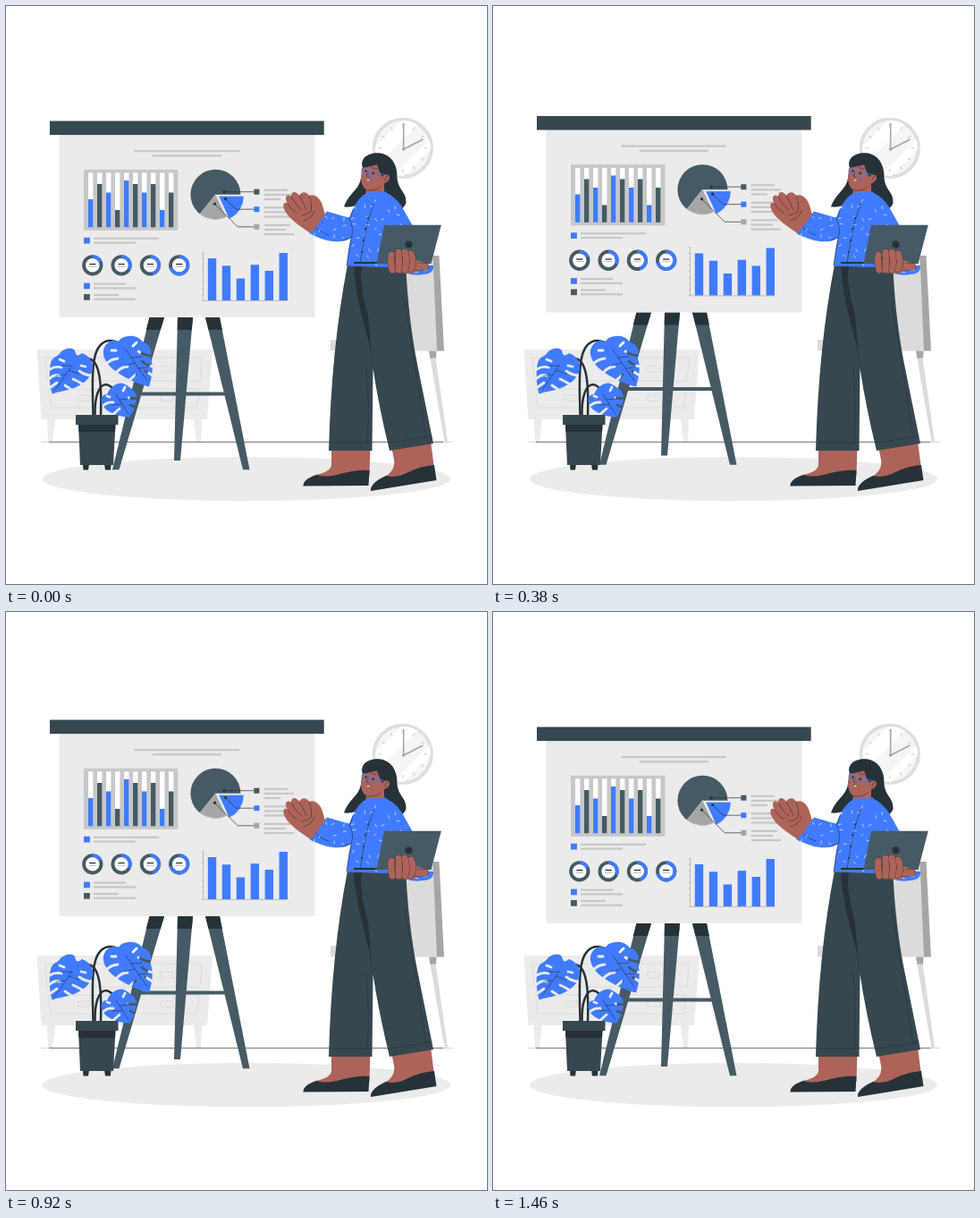
Write an HTML page that moves like this. It is 538 px wide and 646 px high and loops after 1500 ms.

```html
<!DOCTYPE html>
<html lang="en">
<head>
<meta charset="utf-8">
<title>Presentation</title>
<style>
html, body { margin: 0; width: 100%; height: 100%; overflow: hidden; background: #fff; }
svg { display: block; width: 100vw; height: 100vh; }
.blue { fill: #407bff; }
.slate { fill: #455a64; }
.deep { fill: #37474f; }
.ink { fill: #263238; }
.skin { fill: #ae6359; }
.pale { fill: #ebebeb; }
.line { fill: none; stroke: #263238; stroke-width: .6; stroke-linecap: round; stroke-linejoin: round; }
.stem { fill: none; stroke: #263238; stroke-width: 2.5; stroke-linecap: round; }
.slit { fill: none; stroke: #000; stroke-width: 2.8; stroke-linecap: round; }
.drawer { fill: none; stroke: #dbdbdb; stroke-width: .9; }
</style>
</head>
<body>
<svg viewBox="0 0 538 646" preserveAspectRatio="none">
  <defs>
    <clipPath id="face-clip"><circle cx="444" cy="159" r="31"/></clipPath>
    <clipPath id="shirt-clip">
      <path d="M400 211L409 208 424 208Q438 214 446 230L455 246 428 292 381 290.500Q383 270 386 259C378 265 362 266 339 254L359 229.500Q374 234 384 236.500 390 219 400 211Z"/>
    </clipPath>
    <mask id="slits" maskUnits="userSpaceOnUse" x="40" y="360" width="130" height="105">
      <rect x="40" y="360" width="130" height="105" fill="#fff"/>
      <g class="slit">
        <path d="M49 406Q55 402 62 404M48 417Q54 411 60 413M50 426L57 421M97 413Q89 413 82 408M88 424Q82 420 75 417M75 430L66 424M60 395L65 397M84 402L89 403"/>
        <path d="M165 391Q156 391 148 386M165 403Q157 402 152 397M164 413L156 408M111 401Q118 394 125 394M123 410Q129 403 136 403M137 419L145 412M146 376L142 380M118 385L123 385"/>
        <path d="M148 439L137 438M146 449L139 446M108 447Q114 442 120 443M119 457L127 450M133 426L131 430M113 436L116 437"/>
      </g>
    </mask>
  </defs>

  <ellipse class="pale" cx="269" cy="528.6" rx="228" ry="24.6"/>

  <g id="cabinet">
    <path class="pale" d="M34.500 384H231L225 462H39.500ZM46 462H55L52 487H47ZM210 462H219L218 487H213Z"/>
    <path class="drawer" d="M44 393H219.500L217 419H46ZM48 428H216L214 449H50ZM132 393V449"/>
    <path class="drawer" d="M173 402.500H187V409H173ZM173 435H187V441H173ZM80 402.500H94V409H80ZM80 435H94V441H80Z"/>
  </g>
  <path d="M39 487.300H500" stroke="#aaa" stroke-width=".5"/>
  <path d="M48 487.300H489" stroke="#263238" stroke-width=".6"/>

  <g id="clock">
    <circle cx="443.800" cy="158.800" r="32.200" fill="#f5f5f5" stroke="#dedede" stroke-width="3.800"/>
    <path clip-path="url(#face-clip)" fill="#fff" d="M405 165L450 120 468 125 412 181ZM428 195L479 144 483 152 438 197Z"/>
    <g id="ticks" stroke="#c7c7c7" stroke-width=".9"></g>
    <path d="M444.600 161L444.800 131" stroke="#a6a6a6" stroke-width="1.600"/>
    <path d="M444 160.500L466.500 149" stroke="#a6a6a6" stroke-width="1.600"/>
    <circle cx="444.700" cy="160" r="1.800" fill="#a6a6a6"/>
  </g>

  <g id="chair">
    <path d="M440 279H479L483 385.500H363V373H440Z" fill="#dbdbdb"/>
    <path d="M477.500 279H484.500L490 385.500H482ZM473 385.500H481.500L481 394H474.500Z" fill="#a6a6a6"/>
    <path d="M474.500 394L480.500 393 494 487H490.500Z" fill="#dbdbdb"/>
  </g>

  <g id="stand">
    <g class="slate">
      <path d="M150 431.500H245V435.500H150Z"/>
      <path d="M160.500 348H177L126.500 518.300H119Z"/>
      <path d="M192 348H209L195 508H188Z"/>
      <path d="M223 348H239L272.500 518.300H265Z"/>
    </g>
    <path class="ink" d="M160.500 348H177L172.800 362H156.700ZM192 348H209L207.800 362H191.700ZM223 348H239L241.800 362H226.500Z"/>
    <rect class="pale" x="59.500" y="140" width="286" height="208"/>
    <rect class="deep" x="49" y="128.500" width="306.700" height="15.600"/>
    <g id="charts"></g>
  </g>

  <g id="plant">
    <path class="stem" d="M97.500 458C97 420 92 374 117 374Q126 374 134 384"/>
    <path class="stem" d="M106 458C107 425 106 393 90 394Q80 396 74 403"/>
    <path class="stem" d="M99.500 458C99 436 104 423 112 423Q119 424 123 434"/>
    <g class="blue" mask="url(#slits)">
      <path d="M51.500 433.500C48 421 48 407 50 399 52 391 59 392 61 387 66 382 74 381 77 385 78 391 80 392 85 388 93 391 98 397 97 406 94 418 85 423 76 427 68 430 58 431 51.500 433.500Z"/>
      <path d="M160 425.500C150 423 138 418 130 413 118 406 110 398 109 389 108 381 113 376 119 374 124 374 126 376 128 372 134 368 142 368 146 370 151 372 152 376 157 377 163 381 163 388 162 394 165 402 164 413 160 425.500Z"/>
      <path d="M138 459.500C126 459 115 455 110 449 104 442 106 434 113 434 116 427 122 421 130 421.500 135 423 138 426 142 429 147 434 147 440 144 446 144 451 141 455 138 459.500Z"/>
    </g>
    <path class="line" d="M74 402L55 429M134 384L158 419M123 434L137 456M74 402L62 402M70 407L82 411M66 412L56 413M140 393L152 392M144 399L133 402M148 405L158 404M127 440L137 439M130 445L119 446"/>
    <path class="ink" d="M86 512H93L92 518.500H86.500ZM110 512H117.500L117 518.500H111Z"/>
    <path class="deep" d="M81 467H122.500L120 513H83Z"/>
    <path class="ink" d="M81 467H122.500L122 476H81.500Z"/>
    <rect class="deep" x="78" y="457" width="47.500" height="11"/>
  </g>

  <g id="presenter">
    <path class="skin" d="M364 492H407.500L406.500 525 365 532 346 524Q363 521 364 513Z"/>
    <path class="skin" d="M431 492L475 486 479 517 450 533 424 526Q436 519 434 507Z"/>
    <path class="ink" d="M332.500 536.500Q332 529 347 524 356 527 370 524 391 518 406.500 519L405.500 536Z"/>
    <path class="ink" d="M408 542Q407 533 425 525 437 528 450 521 464 514 479 513L481.500 530Z"/>
    <path class="deep" d="M382 289H431L447.500 294C449 330 454 370 460 400L478 489 429 497Q417 448 410.500 405L409.500 497H361Q364 382 382 289Z"/>
    <path class="ink" d="M389 292L398 291Q394 306 405 346L410 406 407 380Q392 330 389 292Z"/>
    <path class="line" d="M362 488H408M428 488L476 481M403 404Q407 450 404 488M390 302Q396 310 404 314M446 330L470 482"/>

    <path class="ink" d="M399 181C395 170 406 163 419 164.500 433 167 438 180 437.500 192 439 207 448 207 447.500 220 444 233 421 230 411 225 404 222 404 215 404 209 398 216 396 226 378 224.500 384 208 395 206 397 192Z"/>
    <path class="skin" d="M404 198L423 196 423 210 411 222 402 211Z"/>
    <path class="skin" d="M398 181Q407 179 415 177.500 418 187 421 191 425 186 429 190 430 196 422 199 418 207 408 206.500 398 206 397 193Z"/>
    <path class="line" d="M424 195Q424 190 428 190M404 206Q414 207 419 202"/>
    <g fill="none" stroke="#407bff" stroke-width=".9">
      <circle cx="402" cy="184.500" r="3.900"/>
      <circle cx="411.500" cy="187.500" r="4.400"/>
      <path d="M416 186.500L424 189"/>
    </g>
    <g class="ink"><circle cx="402.500" cy="184.500" r="1.300"/><circle cx="410.800" cy="186.800" r="1.400"/></g>
    <path class="line" d="M400 179.500L404 180M409 180.500L415 182M405 186L403 190 406 191"/>
    <path d="M403.500 193Q406 194.500 408.500 194 407 196.500 403.500 195.500Z" fill="#fff" stroke="#263238" stroke-width=".5"/>

    <g clip-path="url(#shirt-clip)">
      <rect class="blue" x="335" y="205" width="125" height="90"/>
      <g id="dashes" stroke="#dce7ff" stroke-width=".8" stroke-linecap="round"></g>
    </g>
    <path class="line" d="M384 237Q390 250 386 259L381 290M385 237L388 228M404 211L411 222 424 209M411 222Q404 240 401 258L396 288M345 246Q353 254 361 256M386 259L377 262"/>
    <path class="blue" d="M402 210L406 208 411 221 405 224Q400 218 402 210ZM424 207L427 210 417 224 411 221Z"/>
    <g id="buttons" class="ink"></g>

    <path class="blue" d="M447 290H478Q479 299 467 300 455 302 446 298Z"/>
    <path d="M456 297L461 298M467 296L472 295" stroke="#dce7ff" stroke-width=".8"/>
    <path class="ink" d="M389 286H443V288H389Z"/>
    <path class="slate" d="M423 244.800H486.800L475.500 288H414.500Z"/>
    <circle class="ink" cx="450.500" cy="266.500" r="4.100"/>
    <path class="skin" d="M429 285L456 283 471 288Q474 292 467 293L454 299 431 298Z"/>
    <g id="grip"></g>

    <path class="skin" d="M341 254C328 246 316 237 312 229 308 221 312 218 315 221 310 213 315 209 319 213 319 206 325 207 328 212 331 206 337 208 339 212 345 209 352 215 354 223L357 233Z"/>
    <path class="line" d="M315 221Q320 229 325 231M319 213Q325 224 331 228M328 212Q333 220 336 228M339 212Q343 222 341 230 336 233 331 234M345 229Q342 238 333 240"/>
  </g>
</svg>

<script>
const NS = 'http://www.w3.org/2000/svg';
const BLUE = '#407bff', SLATE = '#455a64', GREY = '#c7c7c7', MID = '#a6a6a6', SKIN = '#ae6359', INK = '#263238';
const $ = id => document.getElementById(id);

function add(parent, tag, attrs) {
  const el = document.createElementNS(NS, tag);
  for (const k in attrs) el.setAttribute(k, attrs[k]);
  return parent.appendChild(el);
}
const charts = $('charts');
const box = (x, y, width, height, fill) => add(charts, 'rect', { x, y, width, height, fill });
const path = (d, fill, stroke = 'none', w = 0) =>
  add(charts, 'path', { d, fill, stroke, 'stroke-width': w });
const rule = (x, y, end) => box(x, y - 1.1, end - x, 2.2, GREY);

function drawCharts() {
  rule(143.5, 162.1, 261);
  rule(164, 167.3, 241);

  // framed columns
  box(87, 182.8, 105.3, 68, GREY);
  [216, 199, 208.5, 228, 195, 199, 208.5, 199, 228, 208.5].forEach((y, i) => {
    const x = 92 + i * 10;
    box(x, 186.4, 5.4, 61, '#fff');
    box(x, y, 5.4, 247.4 - y, i % 2 ? SLATE : BLUE);
  });

  // legends
  [[258.8, BLUE, 171, 145], [309.6, BLUE, 134, 145], [322, SLATE, 126, 145]].forEach(([y, c, a, b]) => {
    box(87, y, 6.9, 6.7, c);
    rule(98, y + 1, a);
    rule(98, y + 5.8, b);
  });

  // rings
  [.18, .32, .45, .7].forEach((part, i) => {
    const cx = 96.8 + i * 32.3, cy = 289.8, r = 9.7, len = 2 * Math.PI * r;
    const ring = { cx, cy, r, fill: '#fff', stroke: SLATE, 'stroke-width': 3.9 };
    add(charts, 'circle', ring);
    add(charts, 'circle', {
      ...ring, fill: 'none', stroke: BLUE,
      'stroke-dasharray': `${part * len} ${len}`, transform: `rotate(-90 ${cx} ${cy})`
    });
    box(cx - 3.6, cy - 1.9, 7.2, 1.3, INK);
    box(cx - 4.5, cy + 1, 9, .8, MID);
  });

  // pie
  add(charts, 'circle', { cx: 234.4, cy: 210.7, r: 28, fill: SLATE });
  path('M234.4 210.7H263V240H246Z', '#ebebeb');
  path('M234.4 210.7L217 232.5A28 28 0 0 0 246.8 235.9Z', MID, '#ebebeb', .5);
  path('M237.6 212.2H266.2A28 28 0 0 1 249.5 238.2Z', BLUE, '#fff', .6);

  const notes = [
    [207.7, SLATE, 244, 207.7, 244, [315, 322, 307]],
    [227.2, BLUE, 245.6, 215.6, 257.2, [315, 313, 322]],
    [246.8, MID, 233.5, 221.2, 259.1, [318, 313, 322]]
  ];
  notes.forEach(([y, c, x, dotY, bend, ends]) => {
    path(`M${x} ${dotY}L${bend} ${y}H278`, 'none', INK, .7);
    add(charts, 'circle', { cx: x, cy: dotY, r: 1.6, fill: INK });
    box(277.3, y - 3, 6.1, 6, c);
    ends.forEach((end, i) => rule(288.6, y - 1.9 + i * 5.1, end));
  });

  // plain columns
  path('M220.6 275V329.4H315', 'none', MID, .7);
  for (let i = 0; i < 9; i++) path(`M218.8 ${275.5 + i * 6.7}H220.6`, 'none', MID, .7);
  [282, 290.3, 304.5, 289.2, 296, 276].forEach((y, i) => box(225.8 + i * 15.95, y, 9.4, 329 - y, BLUE));
}

// round-ended fingers with a thin dark edge
function fingers(id, width, list) {
  list.forEach(d => {
    for (const [stroke, w] of [[INK, width + .6], [SKIN, width]])
      add($(id), 'path', { d, fill: 'none', stroke, 'stroke-width': w, 'stroke-linecap': 'round' });
  });
}

function drawDetails() {
  for (let i = 0; i < 12; i++)
    add($('ticks'), 'path', { d: 'M443.8 131.5V135.5', transform: `rotate(${i * 30} 443.8 158.8)` });

  let seed = 7;
  const rand = () => (seed = seed * 16807 % 2147483647) / 2147483647;
  for (let y = 210; y < 292; y += 11)
    for (let x = 338; x < 458; x += 12) {
      const a = rand() * Math.PI, px = x + rand() * 8, py = y + rand() * 7;
      add($('dashes'), 'path', { d: `M${px} ${py}l${3 * Math.cos(a)} ${3 * Math.sin(a)}` });
    }

  [[405, 237], [402, 249], [400, 262], [398, 275]].forEach(([cx, cy]) =>
    add($('buttons'), 'circle', { cx, cy, r: 1 }));

  fingers('grip', 7.2, ['M455 292Q463 291 469 291.500', 'M453 277Q457 286 453 294',
    'M446 275Q449 286 446 295', 'M439 275Q440 286 439 295', 'M431 278Q430 288 432 295']);
}

// the stand drifts up and back at a steady speed, on 24 steps a second
function draw(ms) {
  const step = Math.floor((ms % 1500 + 4) * .024);
  const p = Math.min(step / 35, 1);
  const lift = 10.76 * (1 - Math.abs(2 * p - 1));
  $('stand').setAttribute('transform', `translate(0 ${-lift})`);
}

drawCharts();
drawDetails();
draw(0);
const start = performance.now();
function tick() {
  draw(performance.now() - start);
  requestAnimationFrame(tick);
}
requestAnimationFrame(tick);
</script>
</body>
</html>
```
